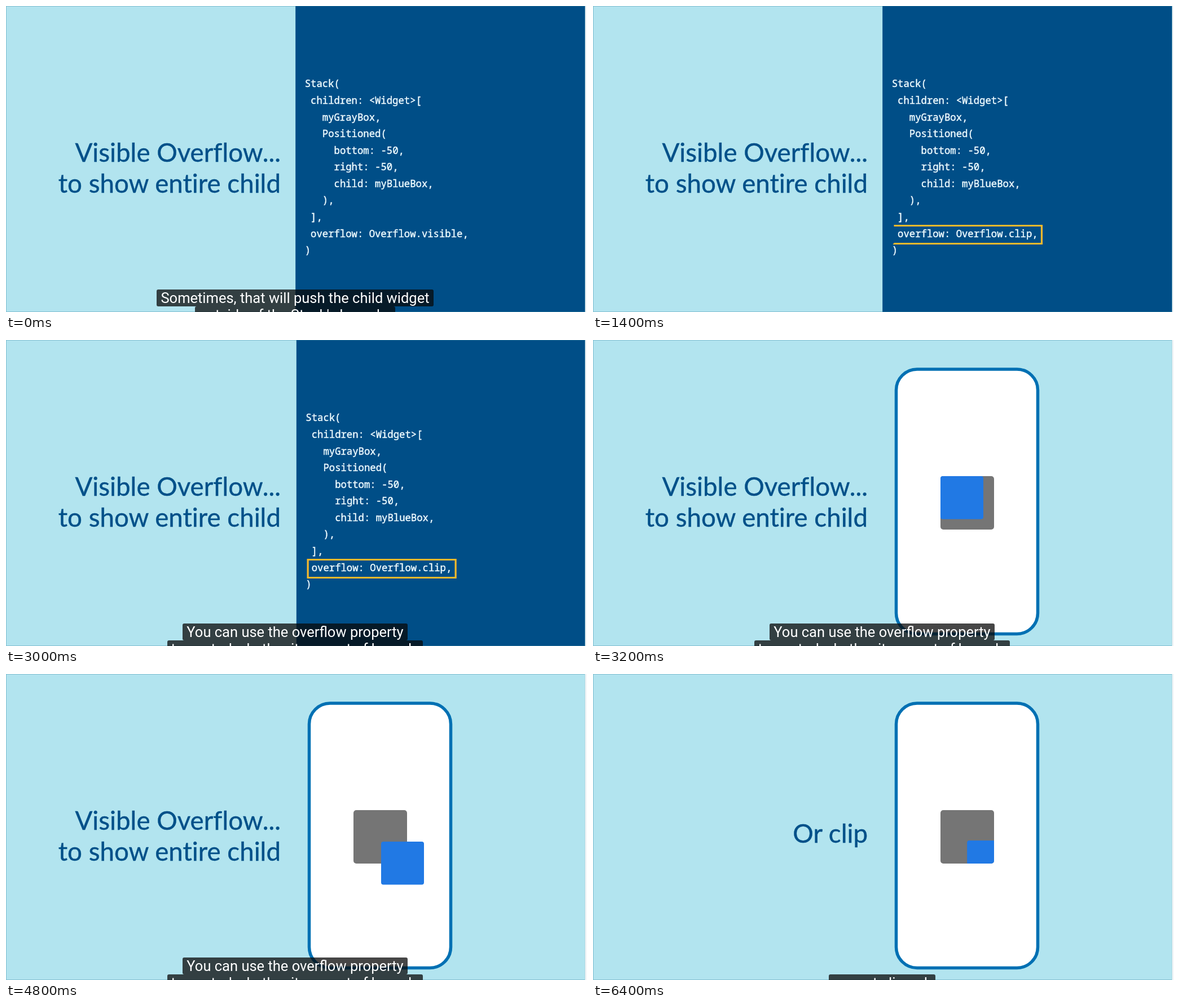
An HTML page that plays this animation: 1030x544 px, repeating every 6600 ms.

```html
<!DOCTYPE html>
<html lang="en">
<head>
<meta charset="utf-8">
<title>Stack overflow property</title>
<style>
  html, body { margin: 0; width: 100%; height: 100%; overflow: hidden; background: #f5f7f8; }
  svg { position: absolute; left: 0; top: 0; }
  .head { font: 45.7px Lato, sans-serif; font-variant-ligatures: none; fill: #005089; stroke: #005089;
    stroke-width: .4; text-anchor: end; }
  .code { font: 500 17.28px "Noto Sans Mono", monospace; fill: #effbff; stroke: #effbff;
    stroke-width: .45; white-space: pre; }
  #caption { position: absolute; left: 0; top: 504px; width: 1025px; height: 40px; overflow: hidden;
    font: 25.5px/30px Roboto, sans-serif; color: #fff; text-align: center; }
  #caption div { height: 30px; white-space: nowrap; }
  #caption span { display: inline-block; padding: 0 7px; border-radius: 3px; background: rgba(8, 8, 8, .75); }
</style>
</head>
<body>
<svg width="1030" height="544" viewBox="0 0 1030 544">
  <defs>
    <clipPath id="stage"><rect width="1026.5" height="544"/></clipPath>
    <clipPath id="parent"><rect x="616" y="242" width="95" height="95" rx="5"/></clipPath>
  </defs>
  <g clip-path="url(#stage)">
    <rect width="1027" height="544" fill="#b2e4ef"/>
    <g id="visibleHead" class="head">
      <text x="487" y="277">Visible Overflow...</text>
      <text x="487" y="332">to show entire child</text>
    </g>
    <text id="clipHead" class="head" x="487" y="300">Or clip</text>
    <rect x="537.5" y="52" width="251" height="470.5" rx="37" fill="#fff" stroke="#0070b3" stroke-width="5.5"/>
    <rect x="616" y="242" width="95" height="95" rx="5" fill="#757575"/>
    <g id="childClip"><rect id="child" width="76" height="76.5" rx="4" fill="#2179e4"/></g>
    <g id="panel">
      <rect x="513.2" width="514" height="544" fill="#004e87"/>
      <g id="code" class="code"></g>
      <path id="mark" d="M533.5 390.5H795.5V422.5H533.5Z" pathLength="1" fill="none" stroke="#f8b92c" stroke-width="3.2"/>
    </g>
    <rect x=".5" y=".5" width="1026" height="543" fill="none" stroke="#3f89a3" stroke-opacity=".4"/>
  </g>
</svg>
<div id="caption"></div>
<script>
const LOOP = 6600, STEP = 200;
const $ = id => document.getElementById(id);
const span = (t, from, to) => Math.min(1, Math.max(0, (t - from) / (to - from)));
const ease = p => p < .5 ? 4 * p ** 3 : 1 - 4 * (1 - p) ** 3;

const source = [
  'Stack(',
  ' children: <Widget>[',
  '   myGrayBox,',
  '   Positioned(',
  '     bottom: -50,',
  '     right: -50,',
  '     child: myBlueBox,',
  '   ),',
  ' ],',
  ' overflow: Overflow.visible,',
  ')'
];
const rows = source.map((line, i) => {
  const row = document.createElementNS('http://www.w3.org/2000/svg', 'text');
  row.setAttribute('x', 529.7 + 10.37 * line.search(/\S/));
  row.setAttribute('y', 144.4 + 29.57 * i);
  row.textContent = line.trim();
  $('code').append(row);
  return row;
});

// Each caption: start, end, lines; an empty line keeps its place.
const captions = [
  [0, 1000, 'Sometimes, that will push the child widget', "outside of the Stack's bounds."],
  [1600, 5200, 'You can use the overflow property', 'to control whether items out of bounds'],
  [5200, LOOP, '', 'are not clipped.']
];
let shown;
function showCaption(t) {
  const now = captions.find(([from, to]) => t >= from && t < to);
  if (now === shown) return;
  shown = now;
  $('caption').innerHTML = (now || []).slice(2)
    .map(line => `<div>${line && `<span>${line}</span>`}</div>`).join('');
}

// The value is erased letter by letter, then the new one is typed.
function overflowValue(t) {
  return t < 600
    ? 'visible'.slice(0, Math.round(7 * (1 - span(t, 100, 600))))
    : 'clip'.slice(0, Math.round(4 * span(t, 600, 1000)));
}

function draw(t) {
  rows[9].textContent = `overflow: Overflow.${overflowValue(t)},`;

  const drawn = span(t, 1000, 1423);
  $('mark').style.display = drawn ? '' : 'none';
  $('mark').setAttribute('stroke-dasharray', drawn < 1 ? `${drawn} 2` : 'none');

  const slide = span(t, 2980, 3200);
  $('panel').style.display = slide < 1 ? '' : 'none';
  $('panel').setAttribute('transform', `translate(${514 * slide ** 2.4})`);

  const clipped = t >= 5800;
  const move = clipped ? ease(span(t, 5800, 6560))
    : ease(span(t, 3400, 4160)) - ease(span(t, 4900, 5660));
  $('child').setAttribute('transform', `translate(${616 + 49 * move} ${242 + 56 * move})`);
  $('childClip').setAttribute('clip-path', clipped ? 'url(#parent)' : 'none');

  $('visibleHead').setAttribute('opacity', 1 - span(t, 5770, 6100));
  $('clipHead').setAttribute('opacity', span(t, 6050, 6350));
  showCaption(t);
}

const start = performance.now();
function tick() {
  const t = (performance.now() - start) % LOOP;
  draw(Math.floor(t / STEP) * STEP);
  requestAnimationFrame(tick);
}
tick();
</script>
</body>
</html>
```
